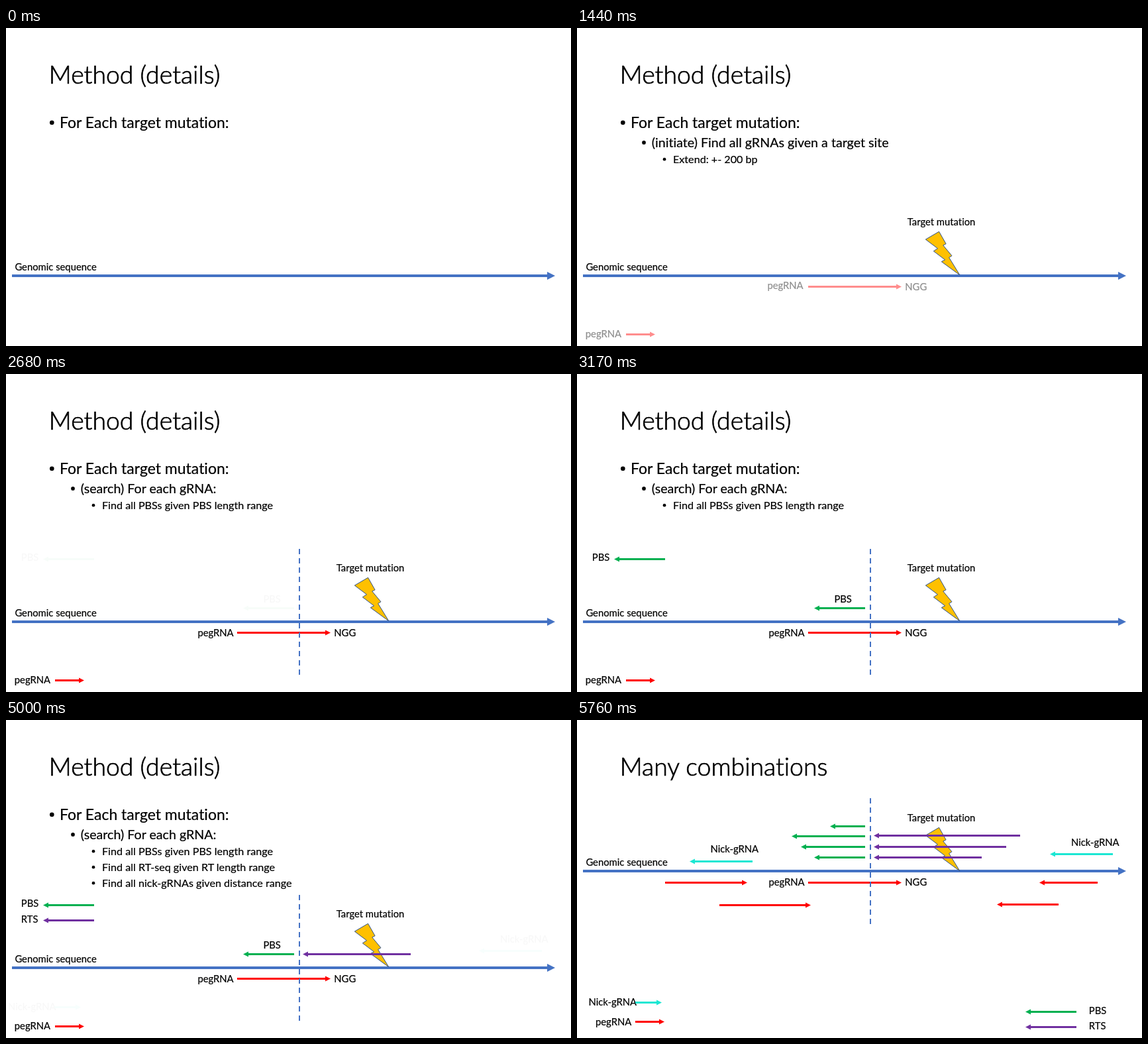
These frames come from a looping animation (853 by 480 pixels, 8000 ms). An HTML page:

```html
<!DOCTYPE html>
<html lang="en">
<head>
<meta charset="utf-8">
<title>Method details</title>
<style>
  html, body { margin: 0; width: 100%; height: 100%; overflow: hidden; background: #fff; }
  svg { display: block; width: 853px; height: 480px; font-family: Lato, Carlito, sans-serif; }
  text { font-variant-ligatures: none; stroke: #000; stroke-width: .2px; }
  .title { font-weight: 300; stroke-width: .7px; }
</style>
</head>
<body>
<svg id="stage" viewBox="0 0 853 480"></svg>
<script>
const BLUE = '#4472c4', RED = '#ff0000', GREEN = '#00b050', PURPLE = '#7030a0', CYAN = '#1be7d3';
const LOOP = 8000, SWITCH = 5760, STEP = 70, STEPS = 8;

const text = (x, y, s, size = 14.8) => `<text x="${x}" y="${y}" font-size="${size}">${s}</text>`;

const title = s => `<text class="title" x="64.8" y="84" font-size="37.4">${s}</text>`;

// Bulleted line, level 0 to 2
function bullet(level, y, s) {
  const size = [23, 19.65, 16.15][level];
  const x = [81, 112.8, 145][level];
  const dot = `<circle cx="${[69.3, 101, 132][level]}" cy="${y - size * .36}" r="${size * .145}"/>`;
  return dot + text(x, y, s, size);
}

// Horizontal arrow from x1 to its tip at x2
function arrow(x1, x2, y, color, width = 3, head = 8) {
  const back = x2 - Math.sign(x2 - x1) * head, half = head / 2;
  return `<path d="M${x1} ${y}H${back}" stroke="${color}" stroke-width="${width}"/>` +
    `<path d="M${x2} ${y}L${back} ${y - half}V${y + half}Z" fill="${color}"/>`;
}

const genome = y => text(13.4, y - 8, 'Genomic sequence') + arrow(9, 829, y, BLUE, 4, 12);

const cut = y =>
  `<path d="M443 ${y}V${y + 190}" stroke="${BLUE}" stroke-width="2" stroke-dasharray="8 6"/>`;

function mutation(y) {
  const bolt = [[8472, 0], [12860, 6080], [11050, 6797], [16577, 12007], [14767, 12877], [21600, 21600],
    [10012, 14915], [12222, 13987], [5022, 9705], [7602, 8382], [0, 3890]];
  const points = bolt.map(([px, py]) => [526.3 + px / 21600 * 51.7, y + 9.3 + py / 21600 * 65.7]);
  return text(498.8, y, 'Target mutation') +
    `<polygon points="${points.join(' ')}" fill="#ffc000" stroke="#2f528f"/>`;
}

const guide = (x, y) => text(x, y, 'pegRNA');
const guideArrows = arrow(349, 490, 390.5, RED) + text(495.3, 396, 'NGG') +
  guide(12.8, 467) + arrow(74, 118, 462.5, RED);

const combinations = title('Many combinations') + genome(228) + mutation(153) +
  [[382, 160.5], [324, 175.5], [338, 191.5], [358, 207.5]].map(([x, y]) => arrow(435, x, y, GREEN)).join('') +
  [[669, 174.5], [648, 191.5], [611, 207.5]].map(([x, y]) => arrow(x, 448, y, PURPLE)).join('') +
  [[133, 257, 245.5], [215, 353, 279.5], [349, 490, 245.5], [786, 698, 245.5], [727, 634, 278.5]]
    .map(a => arrow(...a, RED)).join('') +
  cut(118) + guide(289.4, 250) + text(495.3, 250, 'NGG') +
  text(201.5, 200, 'Nick-gRNA') + arrow(265, 170, 213.5, CYAN) +
  text(746, 190, 'Nick-gRNA') + arrow(809, 714, 202.5, CYAN) +
  text(17.5, 431, 'Nick-gRNA') + arrow(88, 128, 426.5, CYAN) +
  guide(28, 461) + arrow(88, 132, 455.5, RED) +
  arrow(754, 677, 440.5, GREEN) + text(772.8, 444, 'PBS') +
  arrow(754, 677, 463.5, PURPLE) + text(772.8, 467, 'RTS');

// Each part: start, end, fades in, drawing
const parts = [
  [0, SWITCH, 0, title('Method (details)') + bullet(0, 151, 'For Each target mutation:') + genome(374)],
  [340, SWITCH, 1, mutation(298)],
  [1100, 2280, 0, bullet(1, 180, '(initiate) Find all gRNAs given a target site') +
    bullet(2, 204, 'Extend: +- 200 bp')],
  [1230, 2280, 1, guide(287.4, 394) + guideArrows],
  [2280, SWITCH, 0, bullet(1, 180, '(search) For each gRNA:') +
    bullet(2, 204, 'Find all PBSs given PBS length range') + guide(289.4, 396) + guideArrows],
  [1720, SWITCH, 1, cut(264)],
  [2680, SWITCH, 1, text(388.4, 345, 'PBS') + arrow(435, 358, 353.5, GREEN) +
    text(22.8, 282, 'PBS') + arrow(133, 56, 279.5, GREEN)],
  [3440, SWITCH, 0, bullet(2, 228, 'Find all RT-seq given RT length range')],
  [3840, SWITCH, 1, arrow(611, 448, 353.5, PURPLE) +
    text(22.8, 306, 'RTS') + arrow(133, 56, 302.5, PURPLE)],
  [4600, SWITCH, 0, bullet(2, 252, 'Find all nick-gRNAs given distance range')],
  [5000, SWITCH, 1, text(746, 336, 'Nick-gRNA') + arrow(809, 714, 348.5, CYAN) +
    text(3, 438, 'Nick-gRNA') + arrow(73, 113, 433.5, CYAN)],
  [SWITCH, LOOP, 0, combinations]
];

const stage = document.getElementById('stage');
stage.innerHTML = parts.map(p => `<g>${p[3]}</g>`).join('');

function opacity(t, [start, end, fades]) {
  if (t < start || t >= end) return 0;
  const step = Math.floor((t - start) / STEP) + 1;
  return fades ? Math.min(1, (step - .8) / (STEPS - .8)) : 1;
}

function draw() {
  const t = performance.now() % LOOP;
  parts.forEach((part, i) => stage.children[i].setAttribute('opacity', opacity(t, part)));
  requestAnimationFrame(draw);
}
draw();
</script>
</body>
</html>
```
